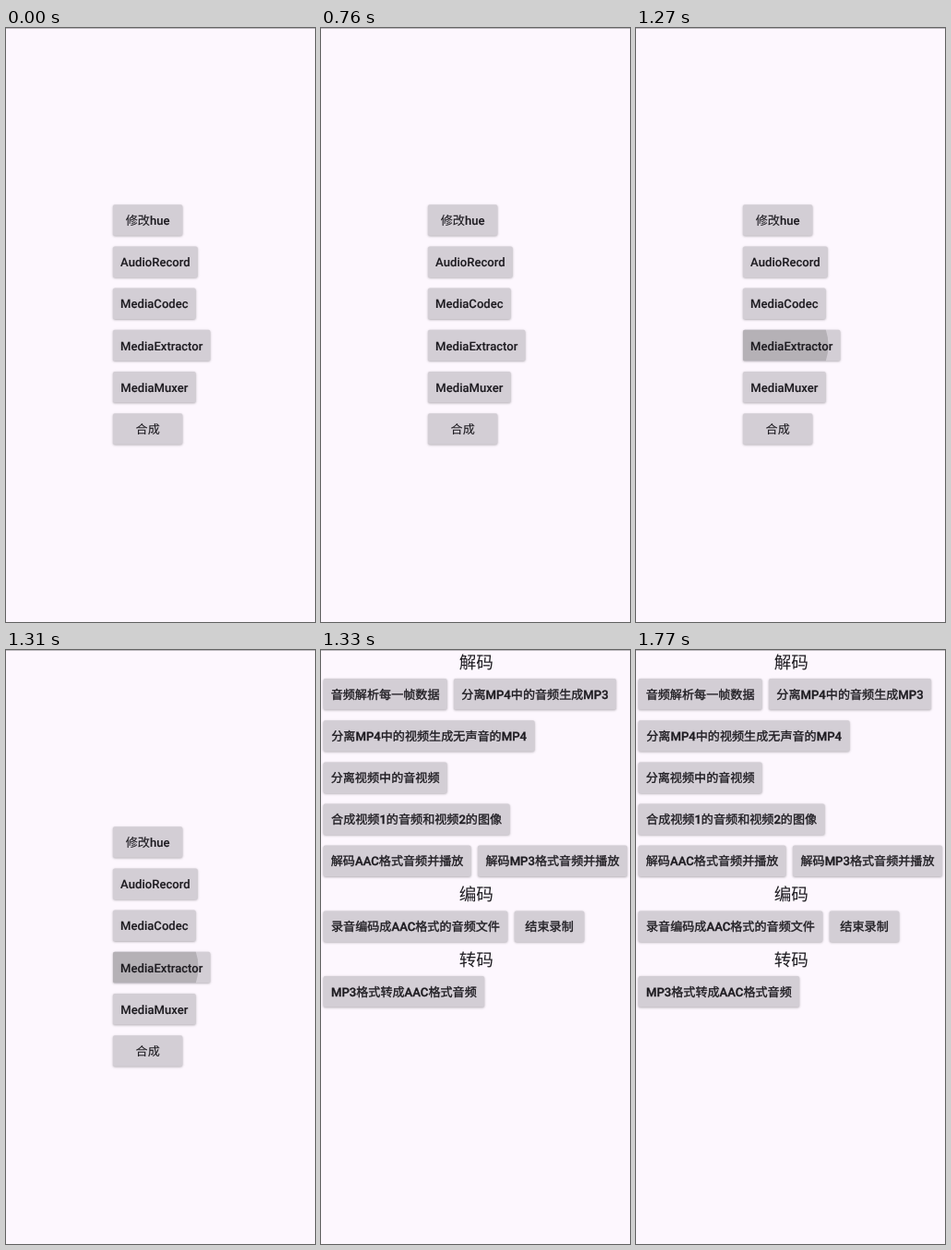
An HTML page with a canvas for the animation above (2070 ms loop, 335 by 643 pixels).

```html
<!DOCTYPE html>
<html lang="zh-CN">
<head>
<meta charset="utf-8">
<style>
html, body { margin: 0; width: 100%; height: 100%; overflow: hidden; background: #fdf7fe; }
canvas { display: block; }
</style>
</head>
<body>
<canvas width="335" height="643"></canvas>
<script>
const ctx = document.querySelector('canvas').getContext('2d');
const LOOP = 2070, PRESS = 1270, OPEN = 1330;
const FONT = 'Roboto, "Noto Sans CJK SC", "Noto Sans CJK", sans-serif';
const BUTTON_H = 33.5;

// Each button: x, y, width, label
const menu = [
  ['修改hue', 75.3], ['AudioRecord', 91.7], ['MediaCodec', 89.7],
  ['MediaExtractor', 105.4], ['MediaMuxer', 89.7], ['合成', 75.3]
].map(([label, w], i) => [116, 191.2 + i * 45.2, w, label]);
const pressed = menu[3];

const tools = [
  [2.6, 31, 134, '音频解析每一帧数据'],
  [144, 31, 176, '分离MP4中的音频生成MP3'],
  [2.6, 76.2, 229, '分离MP4中的视频生成无声音的MP4'],
  [2.6, 121.4, 134, '分离视频中的音视频'],
  [2.6, 166.5, 202, '合成视频1的音频和视频2的图像'],
  [2.6, 211.6, 160, '解码AAC格式音频并播放'],
  [170, 211.6, 162, '解码MP3格式音频并播放'],
  [2.6, 282.4, 199.7, '录音编码成AAC格式的音频文件'],
  [209.8, 282.4, 75.5, '结束录制'],
  [2.6, 353, 174.5, 'MP3格式转成AAC格式音频']
];
const headings = [['解码', 20.1], ['编码', 271.1], ['转码', 341.8]];

// A thin outline in the text colour thickens the strokes.
function text(label, x, y, size, weight, outline) {
  ctx.font = `${weight} ${size}px ${FONT}`;
  ctx.textAlign = 'center';
  ctx.textRendering = 'geometricPrecision';
  ctx.fillStyle = ctx.strokeStyle = '#1d1b20';
  ctx.fillText(label, x, y);
  if (outline) {
    ctx.lineWidth = outline;
    ctx.lineJoin = 'round';
    ctx.strokeText(label, x, y);
  }
}

function button([x, y, w, label], outline, ripple) {
  ctx.save();
  ctx.beginPath();
  ctx.roundRect(x, y, w, BUTTON_H, 1.9);
  ctx.save();
  ctx.shadowColor = 'rgba(0,0,0,.3)';
  ctx.shadowBlur = 2.5;
  ctx.shadowOffsetY = 0.8;
  ctx.fillStyle = '#d3ced5';
  ctx.fill();
  ctx.restore();
  if (ripple) {
    ctx.clip();
    ctx.beginPath();
    ctx.arc(x + 38, y + BUTTON_H / 2, 54.5, 0, Math.PI * 2);
    ctx.fillStyle = '#b5b1b6';
    ctx.fill();
  }
  ctx.restore();
  text(label, x + w / 2, y + 21.7, 13.1, 500, outline);
}

function draw(now) {
  const t = now % LOOP;
  ctx.fillStyle = '#fdf7fe';
  ctx.fillRect(0, 0, 335, 643);
  ctx.fillStyle = '#bfbbc1';
  ctx.fillRect(0, 0, 335, 1);
  if (t < OPEN) {
    for (const b of menu) button(b, 0.1, b === pressed && t >= PRESS);
  } else {
    for (const b of tools) button(b, 0.35);
    for (const [label, y] of headings) text(label, 168.3, y, 18.6, 400);
  }
}

const start = performance.now();
function tick() {
  draw(performance.now() - start);
  requestAnimationFrame(tick);
}
tick();
</script>
</body>
</html>
```
